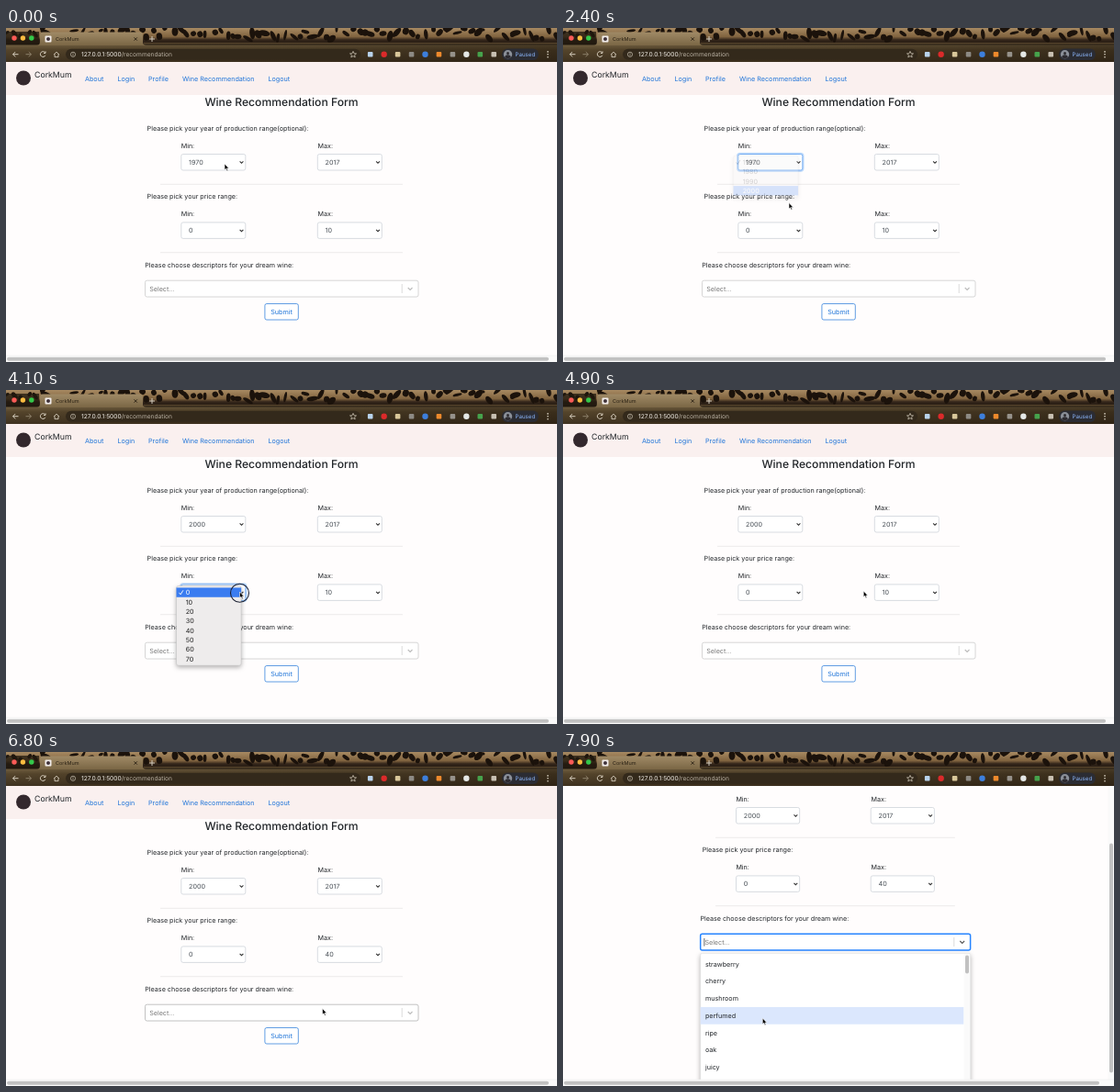
Write an HTML page that moves like this. It is 600 by 364 pixels and loops after 8 s.

```html
<!DOCTYPE html>
<html lang="en">
<head>
<meta charset="utf-8">
<title>Wine form</title>
<style>
  html, body { margin: 0; width: 100%; height: 100%; overflow: hidden; background: #fffdfd; }
  svg { display: block; font: 7.17px Inter, "Open Sans", sans-serif; text-rendering: geometricPrecision; }
  .pop { filter: drop-shadow(0 2px 2.5px rgba(0, 0, 0, .3)); }
</style>
</head>
<body>
<svg width="600" height="364" viewBox="0 0 600 364">
  <defs>
    <linearGradient id="bar" x2="0" y2="1">
      <stop offset="0" stop-color="#6f5d3f"/><stop offset=".3" stop-color="#54442b"/>
      <stop offset="1" stop-color="#3f3220"/>
    </linearGradient>
    <linearGradient id="shade">
      <stop offset="0" stop-color="#20170c" stop-opacity="0"/><stop offset="1" stop-color="#20170c" stop-opacity=".5"/>
    </linearGradient>
    <linearGradient id="tab" x2="0" y2="1">
      <stop offset="0" stop-color="#a08a66"/><stop offset="1" stop-color="#7a6645"/>
    </linearGradient>
    <linearGradient id="fur" x2="0" y2="1">
      <stop offset="0" stop-color="#a88a62"/><stop offset=".5" stop-color="#80633f"/>
      <stop offset=".68" stop-color="#33251a"/><stop offset="1" stop-color="#1f160e"/>
    </linearGradient>
    <clipPath id="view"><path d="M0 37H600V357H0z"/></clipPath>
    <clipPath id="strip"><path d="M0 0H600V19H0z"/></clipPath>
  </defs>
  <rect width="600" height="364" fill="#fffdfd"/>
  <g id="page" clip-path="url(#view)"></g>
  <g id="chrome"></g>
  <g id="over"></g>
</svg>
<script>
const $ = id => document.getElementById(id);
const BRAND = 'CorkMum', LOOP = 8000, ROW = 10.35, OPEN = 7000, SCROLL = 77;
const INK = '#212529', LINK = '#1e74d8';

const text = (x, y, s, fill = INK, more = '') => `<text x="${x}" y="${y}" fill="${fill}" ${more}>${s}</text>`;
const rect = (x, y, w, h, fill, more = '') =>
  `<rect x="${x}" y="${y}" width="${w}" height="${h}" fill="${fill}" ${more}/>`;
const dot = (x, y, r, fill, more = '') => `<circle cx="${x}" cy="${y}" r="${r}" fill="${fill}" ${more}/>`;
const line = (d, stroke, w = 1, more = '') =>
  `<path d="${d}" fill="none" stroke="${stroke}" stroke-width="${w}" ${more}/>`;

// Browser window, drawn once
function chrome() {
  let seed = 11;
  const rnd = () => (seed = seed * 16807 % 2147483647) / 2147483647;
  let s = rect(0, 0, 600, 19, 'url(#fur)') + '<g clip-path="url(#strip)">';
  for (let i = 0; i < 84; i++) {
    const x = i * 7.2 + rnd() * 5, y = rnd() * 12;
    s += `<ellipse cx="${x}" cy="${y}" rx="${2.5 + rnd() * 4}" ry="${1.5 + rnd() * 2}" fill="#1b120b"
      transform="rotate(${rnd() * 180} ${x} ${y})"/>`;
  }
  s += '</g>' + line('M150 16.8H600', '#7d6642', .8) + rect(0, 4, 36, 15, '#21180e', 'opacity=".75"');
  s += rect(0, 18.5, 600, 18.5, 'url(#bar)') + rect(0, 18.5, 600, 18.5, 'url(#shade)');
  s += '<path d="M33 19Q37 19 37 15V8Q37 4.5 40 4.5H146Q149 4.5 149 8V15Q149 19 153 19z" fill="url(#tab)"/>';
  ['#fc5b57', '#fdbc40', '#34c84a'].forEach((c, i) => s += dot(9 + i * 9.4, 11, 2.7, c));
  s += rect(42.5, 8.5, 7, 7, '#f1ecea', 'rx="1"') + dot(46, 12, 2, '#40333a');
  s += text(54, 14, BRAND, '#2b2215', 'font-size="5.5"');
  s += line('M139.5 10.3l3.4 3.4m0-3.4l-3.4 3.4', '#2b2215', .9) + line('M156 12h6M159 9v6', '#e4dccd', .9);
  s += line('M13.5 28.7H7.5m2.7-2.7l-2.7 2.7 2.7 2.7', '#d6cdbd');
  s += line('M21.5 28.7h6m-2.7-2.7l2.7 2.7-2.7 2.7', '#8d8069');
  s += line('M42.6 26.8a2.9 2.9 0 1 0 .3 3M43 25.4v2h-2', '#d6cdbd');
  s += line('M52 29l3-2.8 3 2.8M53 28.6v3h4v-3', '#d6cdbd', .9);
  s += rect(65, 22.8, 321, 12, '#33291b', 'rx="6"');
  s += dot(73, 28.8, 2.6, 'none', 'stroke="#cfc6b7" stroke-width=".7"') + line('M73 28.4v1.8M73 27v.7', '#cfc6b7', .7);
  s += text(82, 31.1, '127.0.0.1:5000<tspan fill="#b9b0a2">/recommendation</tspan>', '#f5f1ea', 'font-size="6.65"');
  s += line('M378 25.4l1 2.3 2.5.2-1.9 1.6.6 2.4-2.2-1.3-2.2 1.3.6-2.4-1.9-1.6 2.5-.2z', '#d9d0c1', .7);
  ['#b9d3ec', '#dc2a2a', '#d9c79a', '#8d8a84', '#3d7fdc', '#ee8a2c', '#96928b', '#e5e8e6', '#46a24c', '#c8c0b2']
    .forEach((c, i) => s += i % 3 == 1 ? dot(396.7 + i * 14.95, 28.8, 3.2, c)
      : rect(393.9 + i * 14.95, 26, 5.6, 5.6, c, 'rx="1"'));
  s += rect(540, 22.5, 40, 12.6, '#2b2c33', 'rx="6.3"');
  s += dot(546.5, 28.8, 4.7, '#8a8f98') + dot(546.5, 27.4, 1.5, '#2d2b30') +
    '<path d="M543.2 32.1q0-2.9 3.3-2.9t3.3 2.9q-3.3 2.6-6.6 0z" fill="#2d2b30"/>';
  s += text(554.5, 31.1, 'Paused', '#8ab4f8', 'font-size="6.2"');
  [25.9, 28.8, 31.7].forEach(y => s += dot(590, y, .8, '#e4dccd'));
  return s;
}

// Native menus: first row centre, choice, and the times of opening and picking
const tens = [10, 20, 30, 40, 50, 60, 70];
const menus = [
  { x: 185.5, y: 146.2, items: [1970, 1980, 1990, 2000], open: 1000, pick: 2200, choice: 3 },
  { x: 185.5, y: 220.6, items: [0, ...tens], open: 4100, pick: 4500, choice: 0 },
  { x: 334.7, y: 220.6, items: [...tens, 1000], open: 5300, pick: 6100, choice: 3 },
];
const FADE = 250;
const value = (m, t) => m.items[t >= m.pick + FADE ? m.choice : 0];
const focused = (m, t) => t >= m.open && t < m.pick + 400;

const path = [
  [0, 238, 148], [300, 238, 148], [900, 252, 142], [1300, 252, 142], [1900, 243, 176], [2200, 244, 177],
  [2400, 246, 190.5], [3600, 254.5, 220], [4600, 254.5, 220], [5200, 400, 218], [5400, 400, 218],
  [5800, 369.5, 248], [6150, 369.5, 248], [6800, 344.5, 279.5], [7100, 344.5, 279.5], [7800, 217.3, 290], [8000, 217.3, 290],
];
const ease = u => u * u * (3 - 2 * u);
function pointer(t) {
  const i = path.findIndex(p => p[0] > t), [a, x, y] = path[i - 1], [b, X, Y] = path[i];
  const u = ease((t - a) / (b - a));
  return [x + (X - x) * u, y + (Y - y) * u];
}

function page(t) {
  const open = t >= OPEN, k = open ? .988 : 1;
  const dy = open ? SCROLL * ease(Math.min(1, (t - OPEN) / 200)) : 0;
  const X = x => x * k;
  const select = (x, y, v, focus) =>
    (focus ? rect(X(x) - 1, y - 1, 70 * k + 2, 19.5, 'none', 'rx="3" stroke="#bcd9fb" stroke-width="1.4"') : '') +
    rect(X(x), y, 70 * k, 17.5, '#fff', `rx="2" stroke="${focus ? '#5b9df0' : '#ced4da'}" stroke-width=".8"`) +
    text(X(x) + 8.3, y + 11.2, v, '#495057') +
    line(`M${X(x + 70) - 6.2} ${y + 7.9}l1.9 1.9 1.9-1.9`, '#333', 1.1);
  const pair = (y, a, b, fa, fb) => text(X(190.7), y - 6.9, 'Min:') + text(X(339.6), y - 6.9, 'Max:') +
    select(190.8, y, a, fa) + select(339.3, y, b, fb);
  const rule = y => line(`M${X(168)} ${y}H${X(432)}`, '#e4e2e2', .7);

  let s = `<g transform="translate(0 ${-dy})">` + rect(0, 37, 600, 36, '#faf0ef');
  s += dot(19, 54.5, 8, '#33282d') + text(31, 53.8, BRAND, INK, 'font-size="8.75"');
  [[86, 'About'], [121.5, 'Login'], [155, 'Profile'], [192, 'Wine Recommendation'], [285.5, 'Logout']]
    .forEach(([x, l]) => s += text(x, 58.2, l, LINK, 'font-size="7.2"'));
  s += text(X(300), 85.4, 'Wine Recommendation Form', INK, 'font-size="12.15" font-weight="500" text-anchor="middle"');
  s += text(X(153.6), 112, 'Please pick your year of production range(optional):');
  s += pair(137.5, value(menus[0], t), 2017, focused(menus[0], t), false) + rule(170.3);
  s += text(X(153.6), 186.3, 'Please pick your price range:');
  s += pair(211.9, value(menus[1], t), value(menus[2], t), focused(menus[1], t), focused(menus[2], t)) + rule(244.7);
  s += text(X(151.3), 260.8, 'Please choose descriptors for your dream wine:');

  const hover = t >= 6700, left = X(151.5), right = X(449);
  s += rect(left, 275.2, right - left, 17.8, '#fff',
    `rx="2" stroke="${open ? '#2684ff' : hover ? '#b3b3b3' : '#ccc'}" stroke-width="${open ? 1.5 : .8}"`);
  s += text(left + 4.7, 286.7, 'Select...', '#787878');
  if (open) s += line(`M${left + 4.2} 280v8.6`, '#222', .7);
  s += line(`M${right - 17.8} 279v10`, '#ccc', .7);
  s += line(`M${right - 11.3} 283l2.4 2.4 2.4-2.4`, open ? '#555' : '#bbb', 1.1);
  s += rect(X(281.9), 300.5, 36.4, 17.5, '#fff', `rx="2" stroke="${LINK}" stroke-width=".7"`);
  s += text(X(300), 311.8, 'Submit', LINK, 'font-size="7.2" text-anchor="middle"');

  if (open) {
    s += rect(left, 296.3, right - left, 141, '#fff', 'rx="2" stroke="#dcdcdc" stroke-width=".6" class="pop"');
    const hot = Math.max(0, Math.floor((pointer(t)[1] + dy - 298.7) / 18.75));
    ['strawberry', 'cherry', 'mushroom', 'perfumed', 'ripe', 'oak', 'juicy'].forEach((l, i) => {
      const y = 298.7 + i * 18.75;
      if (i == hot) s += rect(left, y, right - left - 7.2, 18.75, '#dbe7fd');
      s += text(left + 5.3, y + 11.8, l);
    });
    s += rect(right - 7, 297, 6.6, 140, '#fafafa') + rect(right - 5.6, 298.5, 4, 20, '#c1c1c1', 'rx="2"');
  }
  s += '</g>';
  if (open) s += rect(593.5, 37, 6.5, 320, '#fafafa') + rect(595, 38 + dy * .8, 4, 250, '#c1c1c1', 'rx="2"');
  return s;
}

function popup(m, t) {
  const alpha = t < m.open ? 0 : t <= m.pick ? 1 : 1 - (t - m.pick) / FADE;
  if (alpha <= 0) return '';
  const n = m.items.length, top = m.y - ROW / 2;
  const at = Math.floor((pointer(Math.min(t, m.pick))[1] - top) / ROW);
  const hot = Math.max(0, Math.min(n - 1, at));
  let s = `<g opacity="${alpha}">` +
    rect(m.x, top - 2, 70.6, n * ROW + 4, '#eeecec', 'rx="2.5" stroke="#bdbdbd" stroke-width=".5" class="pop"');
  s += rect(m.x, top + hot * ROW, 70.6, ROW, '#3a7cf0');
  m.items.forEach((v, i) => s += text(m.x + 10.2, m.y + i * ROW + 2.6, v, i == hot ? '#fff' : '#222', 'font-size="7.2"'));
  s += line(`M${m.x + 3} ${m.y + .3}l1.6 2 2.8-4.6`, hot ? '#333' : '#fff', .9);
  return s + '</g>';
}

const presses = [...menus.flatMap(m => [m.open, m.pick - 100]), OPEN];

function over(t) {
  const [x, y] = pointer(t);
  let s = rect(0, 357, 600, 7, '#fafafa') + line('M0 357H600', '#e8e8e8', .5);
  s += rect(1, 358.7, t < OPEN ? 590 : 583, 4, '#c1c1c1', 'rx="2"');
  menus.forEach(m => s += popup(m, t));
  if (presses.some(p => t >= p && t < p + 200)) s += dot(x, y + 1.3, 10, 'none', 'stroke="#1d2233" stroke-width="1.1"');
  return s + `<path transform="translate(${x} ${y})" d="M0 0V6.6L1.5 5.3 2.6 7.8 3.7 7.3 2.6 4.9H4.7z"
    fill="#000" stroke="#fff" stroke-width=".6"/>`;
}

$('chrome').innerHTML = chrome();
let last = -1;
const start = performance.now();
function tick() {
  const t = Math.floor((performance.now() - start) % LOOP / 100) * 100;
  if (t != last) {
    $('page').innerHTML = page(t);
    $('over').innerHTML = over(t);
    last = t;
  }
  requestAnimationFrame(tick);
}
tick();
</script>
</body>
</html>
```
